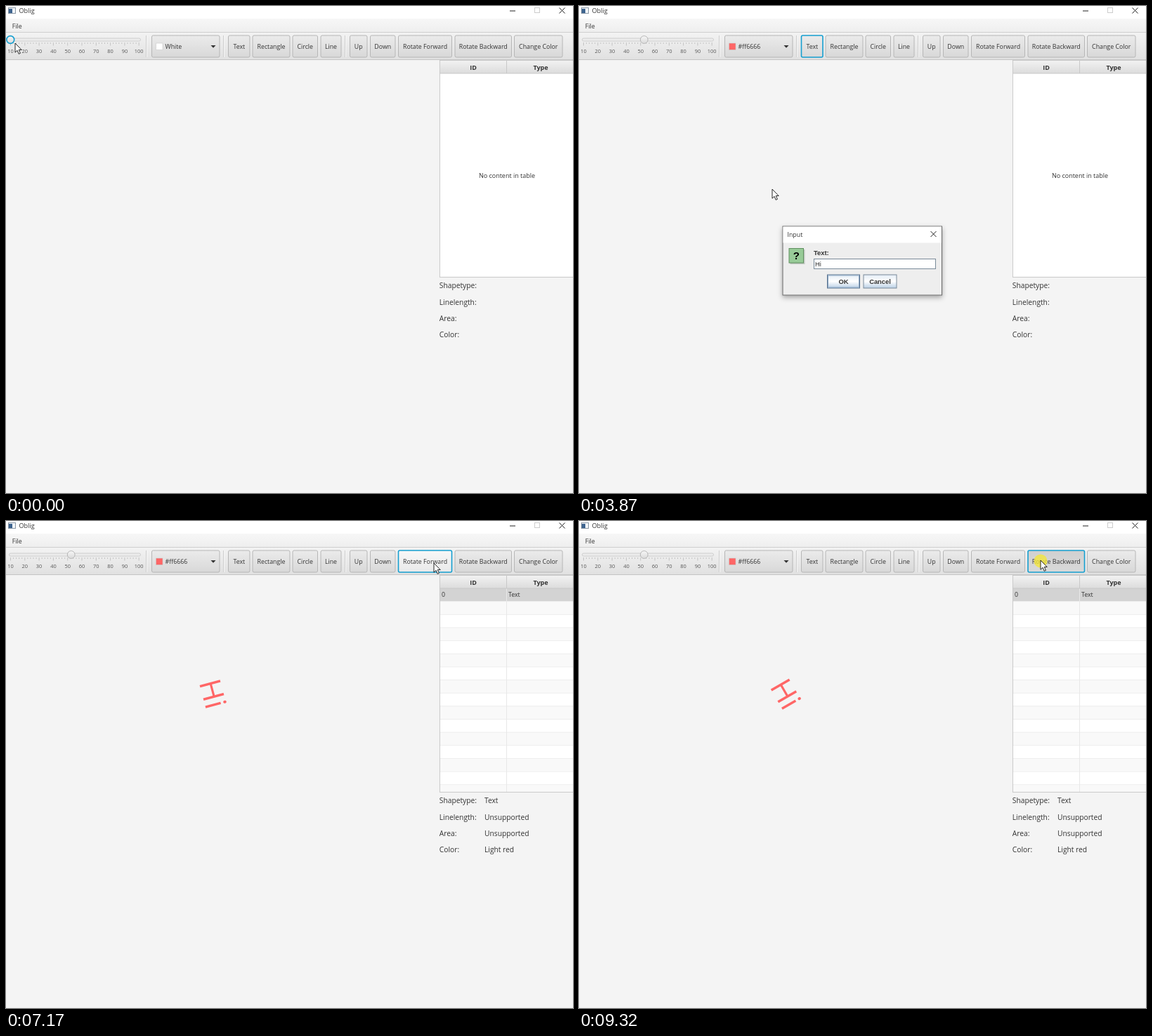
Animation of 807x694 px, one loop 9.4 s. Source, as an HTML page:

```html
<!DOCTYPE html>
<html lang="en">
<head>
<meta charset="utf-8">
<title>Oblig</title>
<style>
html, body { margin: 0; width: 100%; height: 100%; overflow: hidden; background: #f4f4f4; }
svg { display: block; width: 807px; height: 694px; font: 8.8px "Open Sans", "Noto Sans", sans-serif; fill: #333; cursor: default; }
.mid { text-anchor: middle; }
.tick { font-size: 7.4px; fill: #555; }
.info { font-size: 10.25px; }
.head { font-size: 9px; font-weight: bold; }
.swing { font: bold 9.4px "Liberation Sans", Arial, sans-serif; }
.big { font-size: 42px; fill: #f66; }
</style>
</head>
<body>
<svg id="stage" viewBox="0 0 807 694" xmlns="http://www.w3.org/2000/svg"></svg>
<script>
const LOOP = 9400, BLUE = '#159fd0', EDGE = '#b6b6b6';

const rect = (x, y, w, h, fill, more = '') =>
  `<rect x="${x}" y="${y}" width="${w}" height="${h}" fill="${fill}" ${more}/>`;
const line = (x1, y1, x2, y2, color, w = 1) =>
  `<path d="M${x1} ${y1}L${x2} ${y2}" stroke="${color}" stroke-width="${w}"/>`;
const text = (x, y, s, cls = '', more = '') => `<text x="${x}" y="${y}" class="${cls}" ${more}>${s}</text>`;
const group = (id, body, more = '') => `<g id="${id}" ${more}>${body}</g>`;
const grad = (name, ...stops) => `<linearGradient id="fill-${name}" x2="0" y2="1">` +
  stops.map((c, i) => `<stop offset="${i / (stops.length - 1)}" stop-color="${c}"/>`).join('') + '</linearGradient>';
const paint = name => `url(#fill-${name})`;
const range = n => [...Array(n).keys()];

// name, left, right
const buttons = [
  ['Text', 316.5, 347], ['Rectangle', 351, 404], ['Circle', 408, 443.5], ['Line', 448, 477],
  ['Up', 489.5, 514], ['Down', 518.5, 554], ['Rotate Forward', 558.5, 634.5],
  ['Rotate Backward', 639, 719.5], ['Change Color', 723.5, 792]
];

function defs() {
  return '<defs>' +
    grad('menu', '#f7f7f7', '#eeeeee') + grad('bar', '#f3f3f3', '#e0e0e0') +
    grad('face', '#ebebeb', '#d8d8d8') + grad('hover', '#f8f8f8', '#e9e9e9') +
    grad('armed', '#d0d0d0', '#d9d9d9') + grad('header', '#f2f2f2', '#dcdcdc') +
    grad('knob', '#f7f7f7', '#dadada') + grad('popup', '#f5f5f5', '#f4f4f4', '#f3f3f3', '#dddddd') +
    grad('metal', '#e4edf6', '#ffffff', '#b9cfe5') +
    '<filter id="shade" x="-20%" y="-20%" width="140%" height="150%">' +
    '<feDropShadow dx="0" dy="3" stdDeviation="3.5" flood-opacity=".33"/></filter></defs>';
}

function titleBar() {
  return rect(0, 0, 807, 18, '#fff') +
    rect(3.5, 2.5, 10, 8, '#f4f7fa', 'stroke="#8a97a5"') + rect(4, 4, 5, 6, '#3d648f') +
    text(18.6, 9.8, 'Oblig', '', 'font-size="9"') + line(717, 7, 725, 7, '#222') +
    rect(752.5, 2.5, 7, 7, 'none', 'stroke="#ccc"') +
    line(787.5, 2.5, 795.5, 10.5, '#222') + line(795.5, 2.5, 787.5, 10.5, '#222') +
    rect(0, 18, 807, 20, paint('menu')) + text(8.7, 31.5, 'File');
}

function slider() {
  const x = i => 6.5 + i * 4.06;
  return rect(4.5, 46, 187, 4, '#ececec', `rx="2" stroke="#c6c6c6" stroke-width=".8"`) +
    range(46).map(i => line(x(i), 52, x(i), i % 5 ? 54 : 56.5, '#b9b9b9', .8)).join('') +
    range(10).map(i => text(x(i * 5), 66.7, 10 + i * 10, 'tick mid')).join('') +
    `<circle id="knob" cy="48" r="5.4" fill="${paint('knob')}"/>`;
}

function toolbar() {
  return rect(0, 38, 807, 39, paint('bar')) + line(0, 37.5, 807, 37.5, '#cfcfcf') + line(0, 76.5, 807, 76.5, '#c4c4c4') +
    [199.5, 309.5, 482.5].map(x => line(x, 42, x, 73, '#cdcdcd') + line(x + 1, 42, x + 1, 73, '#f6f6f6')).join('') +
    slider() +
    rect(207.5, 42, 96.5, 31, paint('face'), 'id="combo" rx="2"') +
    rect(213.5, 53, 9.5, 9.5, '#fff', 'id="swatch" stroke="#c9c9c9" stroke-width=".6"') +
    text(226.5, 61.2, '', '', 'id="color-name"') + '<path d="M291.5 56h7l-3.5 3.8z"/>' +
    buttons.map(([s, a, b], i) => rect(a, 42, b - a, 31, paint('face'), `id="b${i}" rx="2"`) +
      text((a + b) / 2, 61.2, s, 'mid')).join('');
}

function table() {
  const rows = range(16).map(i => {
    const y = 96 + i * 18.65;
    return rect(617.5, y, 190, Math.min(18.65, 386.5 - y), i % 2 ? '#f9f9f9' : '#fff', i ? '' : 'id="row"') +
      (i ? line(617.5, y, 807, y, '#ededed') : '');
  }).join('');
  return rect(617.5, 77.5, 190, 309, '#fff') +
    group('empty', text(713, 245, 'No content in table', 'mid', 'font-size="9"')) +
    group('rows', rows + line(712.5, 96, 712.5, 386, '#e8e8e8') +
      group('cells', text(620, 108.4, '0') + text(715, 108.4, 'Text'))) +
    rect(617.5, 77.5, 190, 18.5, paint('header')) + line(617, 96, 807, 96, '#c8c8c8') +
    line(712.5, 78, 712.5, 96, '#c8c8c8') + text(665, 90.6, 'ID', 'head mid') + text(761, 90.6, 'Type', 'head mid') +
    rect(617.4, 77.4, 192, 309, 'none', 'id="frame"');
}

function info() {
  const col = (x, list) => list.map((s, i) => text(x, 402.4 + i * 23.3, s, 'info')).join('');
  return col(616.8, ['Shapetype:', 'Linelength:', 'Area:', 'Color:']) +
    group('values', col(681, ['Text', 'Unsupported', 'Unsupported', 'Light red']));
}

function palette() {
  const P = 12.4, X = 217.5;
  const top = '#00d5f0 #008484 #00f #000084 #ff1aff #851a78 #e60000 #840000 #ff0 #848400 #009a00 #00d200'.split(' ');
  const gray = [255, 242, 230, 204, 179, 153, 128, 102, 77, 51, 26, 0];
  const dark = '033 018 106 303 402 900 930 950 960 990 660 030'.split(' ');
  const tint = (hex, row) => `rgb(${[...hex].map(c => Math.min(255, parseInt(c, 16) * 17 + row * 25.6 | 0))})`;
  const cell = (col, y, fill) => rect(X + col * P, y, 11.7, 11.7, fill);
  return group('popup',
    rect(207.5, 73.5, 167.5, 199, paint('popup'), 'rx="3" stroke="#bdbdbd" filter="url(#shade)"') +
    top.map((c, i) => cell(i, 83.2, c)).join('') +
    gray.map((v, i) => cell(i, 104.2, `rgb(${v},${v},${v})`)).join('') +
    range(9).map(r => dark.map((c, i) => cell(i, 116.6 + r * P, tint(c, r))).join('')).join('') +
    rect(277, 163, 18, 18, '#f66', `id="pick" stroke="${BLUE}" stroke-width="1.6"`) +
    line(216, 236.5, 366, 236.5, '#cfcfcf') +
    text(291, 258, 'Custom Color...', 'mid', 'text-decoration="underline"'));
}

function dialog() {
  const key = (x, w, s, edge) => rect(x, 383, w, 19, paint('metal'), `stroke="${edge}"`) + text(x + w / 2, 396, s, 'swing mid');
  return group('dialog',
    rect(290, 314, 226.5, 98, '#eee', 'stroke="#666" filter="url(#shade)"') +
    rect(290.5, 314.5, 225.5, 23, '#fff') + text(296.5, 328.6, 'Input') +
    line(500.5, 321, 508.5, 329, '#222') + line(508.5, 321, 500.5, 329, '#222') +
    rect(300.5, 347, 21, 21, '#c3c9c3') + rect(299, 345.5, 20.5, 20.5, '#98cb98', 'stroke="#5f8f5f"') +
    text(309.3, 361, '?', 'swing mid', 'style="font-size:15px;fill:#000"') +
    text(334, 355.2, 'Text:', 'swing') +
    rect(334.5, 360.5, 173, 14, '#fff', 'stroke="#7a8a99"') +
    text(336, 371.2, '', 'swing', 'id="typed" style="font-weight:normal"') +
    key(353.5, 46, 'OK', '#56708c') + rect(354.5, 384, 44, 17, 'none', 'stroke="#8ea9c6"') +
    key(405, 47, 'Cancel', '#7a8a99'));
}

document.getElementById('stage').innerHTML = defs() + rect(0, 0, 807, 694, '#f4f4f4') +
  titleBar() + toolbar() + table() + info() +
  group('word', text(273, 262, 'Hi', 'big')) + palette() + dialog() +
  group('pointer', '<circle r="9.5" cx="0" cy="1" fill="#f3e63c" fill-opacity=".8" id="glow"/>' +
    '<path d="M0 0V13.2L3.1 10.3 5.2 15.3 7.4 14.3 5.3 9.5H9.2Z" fill="#fff" stroke="#111" stroke-width=".9"/>');

const $ = id => document.getElementById(id);
const set = (id, attrs) => { for (const k in attrs) $(id).setAttribute(k, attrs[k]); };
const show = (id, on) => set(id, { opacity: +on });

// time, x, y of the pointer tip
const path = [
  [0, 13, 53], [140, 13, 53], [620, 99.5, 59], [700, 99.5, 60], [1040, 286, 62], [1120, 286, 62],
  [1270, 282, 172], [1680, 284, 174], [1990, 318, 100], [2070, 322, 92], [2230, 337, 62], [2310, 337, 62],
  [2630, 275, 261], [4420, 275, 261], [5060, 676, 111], [5450, 676, 111], [6000, 609, 60],
  [7960, 609, 60], [8120, 655, 57], [8300, 655, 57], [8360, 657, 56], [LOOP, 657, 56]
];
const forward = [6400, 6560, 6780, 6960, 7170, 7330, 7490, 7640, 7800, 7960];
const backward = [8440, 8600, 8760, 8910, 9080, 9240];
const clicks = [1120, 1680, 2310, 2710, 5290, ...forward, ...backward, LOOP];
const focus = [[0, 'knob'], [1120, 'combo'], [2230, 'b0'], [5290, 'frame'], [6320, 'b6'], [8360, 'b7']];

const ramp = (t, a, b) => Math.max(0, Math.min(1, (t - a) / (b - a)));
const count = (list, t) => list.filter(c => c <= t).length;

function pointerAt(t) {
  const i = Math.max(1, path.findIndex(p => p[0] > t));
  const [a, b] = [path[i - 1], path[i]];
  const u = ramp(t, a[0], b[0]), e = u * u * (3 - 2 * u);
  return [a[1] + (b[1] - a[1]) * e, a[2] + (b[2] - a[2]) * e];
}

function draw(t) {
  const [x, y] = pointerAt(t);
  const down = clicks.some(c => t >= c - 80 && t < c);
  const active = focus.filter(f => f[0] <= t).pop()[1];
  const ring = (id, edge = EDGE) =>
    set(id, { stroke: id === active ? BLUE : edge, 'stroke-width': id === active ? 1.6 : 1 });
  const face = (id, a, b) => {
    const over = x >= a && x <= b && y >= 42 && y <= 73;
    set(id, { fill: paint(over ? down ? 'armed' : 'hover' : 'face') });
    ring(id);
  };

  buttons.forEach(([, a, b], i) => face('b' + i, a, b));
  face('combo', 207.5, 304);
  ring('knob');
  ring('frame', '#c8c8c8');
  set('knob', { cx: 6.3 + 86.4 * ramp(pointerAt(Math.min(t, 700))[0], 13, 99.5) });

  const picked = t >= 1680;
  set('swatch', { fill: picked ? '#f66' : '#fff' });
  $('color-name').textContent = picked ? '#ff6666' : 'White';
  show('popup', t >= 1120 && !picked);
  show('pick', t >= 1240);

  show('dialog', ramp(t, 2800, 3100) * (1 - ramp(t, 3940, 4110)));
  $('typed').textContent = 'Hi'.slice(0, count([3260, 3410], t));

  const placed = t >= 4110, selected = t >= 5290;
  show('word', placed);
  show('rows', placed);
  show('empty', !placed);
  show('values', selected);
  set('row', { fill: !selected ? '#fff' : active === 'frame' ? '#0096c9' : '#d3d3d3' });
  set('cells', { fill: active === 'frame' ? '#fff' : '#333' });
  const turn = 15 * (count(forward, t) - count(backward, t));
  set('word', { transform: `rotate(${turn} 294.5 247)` });

  set('pointer', { transform: `translate(${x} ${y})` });
  show('glow', down);
}

const start = performance.now();
(function tick() {
  draw((performance.now() - start) % LOOP);
  requestAnimationFrame(tick);
})();
</script>
</body>
</html>
```
